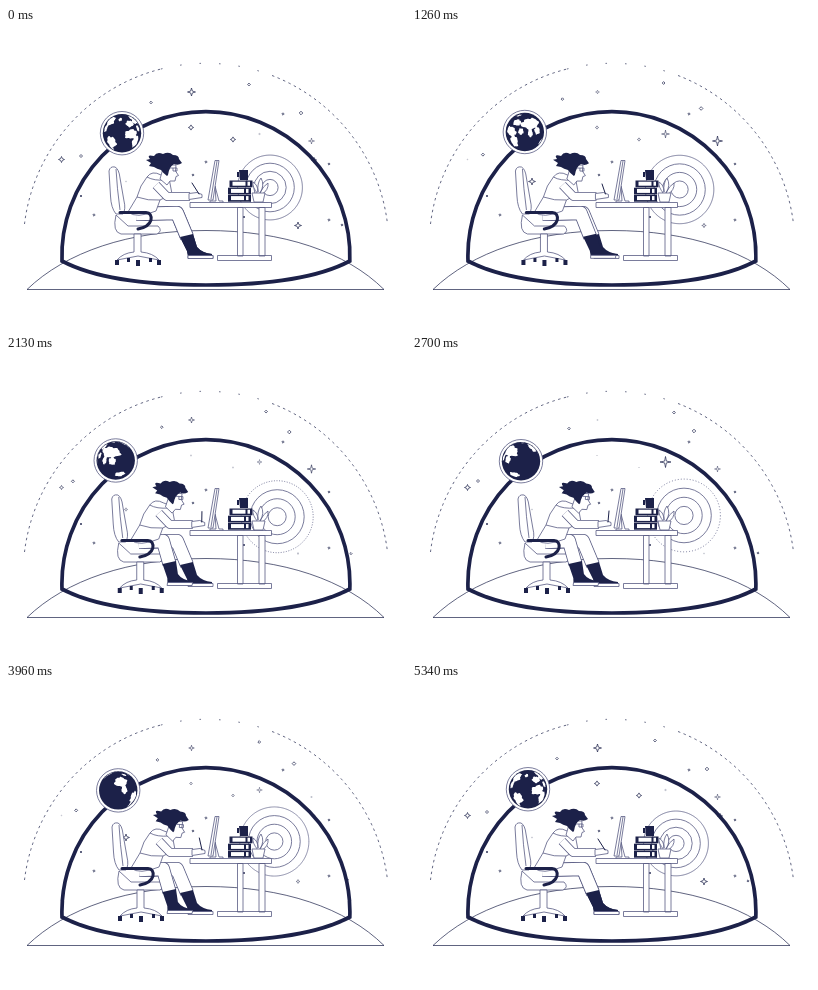
Write an HTML page that moves like this. It is 400x300 px and loops after 5370 ms.

```html
<!DOCTYPE html>
<html lang="en">
<head>
<meta charset="utf-8">
<title>Working under a dome</title>
<style>
  html, body { margin: 0; width: 100%; height: 100%; overflow: hidden; background: #fff; }
  svg { display: block; width: 100vw; height: 100vh; }
  .thin { fill: #fff; stroke: #585b83; stroke-width: .8; stroke-linejoin: round; }
  .line { fill: none; stroke: #585b83; stroke-width: .8; }
  .dark { stroke: #1c2149; stroke-width: .7; }
  .ink { fill: #1c2149; }
  .bold { fill: none; stroke: #1c2149; stroke-width: 3; stroke-linecap: round; }
  .limb { fill: none; stroke-linejoin: round; }
</style>
</head>
<body>
<svg viewBox="0 0 400 300">
  <path class="line dark" stroke-dasharray="2.5 3.5" d="M18.5 196A182.5 182.5 0 0 1 155 41M266 47.500A182.5 182.5 0 0 1 381.500 196"/>
  <path class="line dark" stroke-dasharray="1.5 18" d="M155 41A182.5 182.5 0 0 1 266 47.500"/>
  <path class="thin dark" d="M21 261.500C60 224 123 202.500 200 202.500S340 224 378 261.500Z"/>
  <g id="target"></g>
  <g id="stars"></g>
  <path class="bold" style="stroke-width:3.700" d="M56 233A144 144 0 1 1 343.800 233C312 250 258 257 200 257S88 250 56 233Z"/>
  <g id="globe">
    <circle class="thin" r="21.700"/>
    <circle class="ink" r="19.200"/>
    <path id="land" fill="#fff"/>
  </g>

  <g id="chair">
    <path class="thin" d="M103 143Q104 138 109 139Q113 141 114 150L118 173Q120 181 117 186H110Q105 180 104.500 168Z"/>
    <path class="line" d="M110 141Q111 160 114 182"/>
    <path class="thin" d="M110 187Q106 204 115 206H151Q157 203 152 198H122Z"/>
    <path class="thin" d="M128 206H135V224Q147 225 153 232L132 228L111 232Q117 225 128 224Z"/>
    <path class="ink" d="M109 232h4v5h-4zM121 230h3v4h-3zM130 232h4v6h-4zM143 230h3v4h-3zM151 232h4v5h-4z"/>
  </g>

  <g id="farLeg"></g>
  <g id="nearLeg"></g>

  <g id="torso">
    <path class="thin" d="M155 147Q146 142 141 149Q134 157 131 169L122 184Q130 191 150 183L154 172L166 166L163 150Z"/>
    <path class="line" d="M141 149Q148 153 160 152M131 169Q142 173 154 172"/>
  </g>
  <g id="head">
    <path class="thin" d="M158 137H170L169.500 143L172.500 147.500L170 148.500L169 153H164L161 157L154 151Z"/>
    <path class="ink" d="M161 148Q157 145 155 142Q151 141 148 139L143 138L145 135L140 132L144 131Q140 126 148 128Q151 123 157 126Q163 123 167 127Q173 127 173 131L176 135Q172 138 168 136Q163 139 162 147Z"/>
    <path class="line" d="M164 140H171V143H167V140"/>
  </g>
  <g id="arm"></g>
  <path id="pen" class="bold" style="stroke-width:1"/>
  <path id="armrest" class="bold" d="M114 184.500H140Q146 185 145 192Q143 199 132 201"/>

  <path class="thin" d="M209 158L213 173H217V175H204V173H210Z"/>
  <path class="thin" d="M209 132.500H213L207 172H202Z"/>
  <path class="line" d="M211 133L205 171"/>
  <path class="thin" d="M231.500 179.500H237V228H231.500ZM253 179.500H259V228H253ZM211.500 227.500H265.500V232.500H211.500ZM184 174.500H265.500V179.500H184Z"/>
  <g id="books"></g>
  <path class="ink" d="M233 142H242V152H234ZM231 144h2v5h-2z"/>
  <path class="thin" d="M252 166Q246 159 247 154Q252 157 252 164Q251 155 255 150Q259 157 254 165Q257 158 262 155Q263 162 255 167Z"/>
  <path class="thin" d="M246 165H259L257 174H248Z"/>
</svg>
<script>
const LOOP = 5370;
const TAU = Math.PI * 2;
const $ = id => document.getElementById(id);

function add(parent, tag, attrs) {
  const node = document.createElementNS('http://www.w3.org/2000/svg', tag);
  for (const name in attrs) node.setAttribute(name, attrs[name]);
  return parent.appendChild(node);
}
const move = (node, x, y, extra = '') => node.setAttribute('transform', `translate(${x} ${y}) ${extra}`);
const mix = (a, b, k) => a + (b - a) * k;
function ramp(t, from, to) {
  const k = Math.min(1, Math.max(0, (t - from) / (to - from)));
  return k * k * (3 - 2 * k);
}

function makeLimb(parent, width) {
  const outer = add(parent, 'path', { class: 'limb', stroke: '#585b83', 'stroke-width': width });
  const inner = add(parent, 'path', { class: 'limb', stroke: '#fff', 'stroke-width': width - 1.6 });
  return d => [outer, inner].forEach(path => path.setAttribute('d', d));
}

function makeLeg(parent) {
  const limb = makeLimb(parent, 14);
  const shoe = add(parent, 'g');
  add(shoe, 'path', { class: 'ink', d: 'M-7 0L6 -3L10 10Q15 16 25 17V19H1L0 14Z' });
  add(shoe, 'path', { class: 'thin', d: 'M1 18.500H26V21.500H1Z' });
  return (hip, knee, x, y, skew) => {
    limb(`M${hip} 186L${knee} 185L${x} ${y}`);
    move(shoe, x, y, `skewX(${skew})`);
  };
}
const farLeg = makeLeg($('farLeg'));
const nearLeg = makeLeg($('nearLeg'));
const sleeve = makeLimb($('arm'), 9);
const hand = add($('arm'), 'path', { class: 'thin', d: 'M-10 -3L-2 -4L3 -2L3 1L-10 3Z' });

for (let i = 0; i < 3; i++) {
  const y = 152.500 + i * 7.2, x = i ? 222 : 223.500;
  add($('books'), 'rect', { class: 'ink', x, y, width: 23, height: 6.8 });
  add($('books'), 'rect', { x: x + 3, y: y + 1.2, width: 13, height: 4, fill: '#fff' });
  add($('books'), 'rect', { x: x + 18, y: y + 1.2, width: 2.5, height: 4, fill: '#fff' });
}

const rings = [4, 3, 2, 1].map(step => ({ step, node: add($('target'), 'circle', { class: 'thin' }) }));

// Stars stay in place and pulse a whole number of times per loop.
const sparkles = [];
function sparkle(x, y, r, pulses, phase = 0) {
  const d = `M0 ${-r}L.9 -.9L${r} 0L.9 .9L0 ${r}L-.9 .9L${-r} 0L-.9 -.9Z`;
  sparkles.push({ x, y, pulses, phase, node: add($('stars'), 'path', { class: 'thin dark', d }) });
}
sparkle(185.5, 64, 4, 3);
sparkle(253.5, 106, 5.5, 3, .5);
sparkle(305.5, 113, 5, 1, .75);
sparkle(292, 197.5, 3.5, 1);
sparkle(120, 153.5, 3.5, 2, .5);
sparkle(55.5, 131.5, 3, 2);
sparkle(227, 111.5, 2.6, 1);
sparkle(185, 99.5, 2.6, 1);
sparkle(308, 132, 2.6, 1);

// Small diamonds drift on ellipses.
const dots = [];
function dot(x, y, r, swing = 0, rise = 0, lift = 0) {
  const node = add($('stars'), 'path', { class: 'thin dark', d: `M0 ${-r}L${r} 0L0 ${r}L${-r} 0Z` });
  dots.push({ x, y, swing, rise, lift, node });
}
dot(151, 73.5, 1.3, -6, 1, -2.5);
dot(252.5, 56.5, 1.4, -9.5, 0, -1.5);
dot(288.5, 80, 1.8, 6.5, 5);
dot(70.5, 126.5, 1.5, 4.5, 1.5);
dot(341, 197, 1.1, -5, 0, 1);
dot(277, 86, 1.2);
dot(323, 192, 1.2);
dot(323, 136, 1.1);
dot(75, 168, 1);
dot(88, 187, 1.2);
dot(187, 147, 1.1);
dot(200, 134, 1.2);
dot(238, 189, 1);

// Land is a union of rippled blobs in longitude and latitude.
const RAD = Math.PI / 180;
const TILT = 24 * RAD;
function blob(lon, lat, width, height) {
  return Array.from({ length: 40 }, (_, i) => {
    const a = TAU * i / 40;
    const size = 1 + .1 * Math.sin(5 * a + lon) + .06 * Math.sin(9 * a + lat);
    return [(lon + width * size * Math.cos(a)) * RAD, (lat + height * size * Math.sin(a)) * RAD];
  });
}
const land = [
  blob(-105, 52, 32, 17), blob(-97, 25, 10, 13), blob(-40, 72, 16, 8),
  blob(-60, -10, 18, 19), blob(-67, -36, 7, 16),
  blob(8, 18, 23, 14), blob(24, -12, 14, 22), blob(47, 25, 9, 10),
  blob(18, 51, 22, 11), blob(92, 50, 50, 18), blob(79, 20, 8, 13),
  blob(107, 22, 12, 12), blob(134, -25, 18, 10)
];

function project([lon, lat], center) {
  const depth = Math.cos(lat) * Math.cos(lon - center);
  const x = Math.cos(lat) * Math.sin(lon - center);
  const y = Math.sin(lat) * Math.cos(TILT) - depth * Math.sin(TILT);
  const z = Math.sin(lat) * Math.sin(TILT) + depth * Math.cos(TILT);
  const rim = z > 0 ? 1 : Math.hypot(x, y) || 1; // hidden points slide along the rim
  return { x: 18.6 * x / rim, y: -18.6 * y / rim, z };
}

function landPath(center) {
  return land.map(shape => {
    const points = shape.map(point => project(point, center));
    if (points.every(p => p.z <= 0)) return '';
    return `M${points.map(p => `${p.x.toFixed(2)} ${p.y.toFixed(2)}`).join('L')}Z`;
  }).join('');
}

function draw(t) {
  const turn = t / LOOP;
  const cos = Math.cos(TAU * turn), sin = Math.sin(TAU * turn);

  move($('globe'), 112.5 + 3.5 * cos, 105.2 - 1.2 * sin);
  $('land').setAttribute('d', landPath((360 * turn - 24) * RAD));

  move($('target'), 268 - 4 * cos, 159.5 + 2 * sin);
  for (const { node, step } of rings) node.setAttribute('r', step * (8.6 - .5 * cos));
  rings[0].node.setAttribute('stroke-dasharray', `1 ${Math.max(0, -2 * cos)}`);

  for (const s of sparkles) {
    move(s.node, s.x, s.y, `scale(${.6 + .4 * Math.cos(TAU * (s.pulses * turn + s.phase))})`);
  }
  for (const d of dots) move(d.node, d.x + d.swing * cos, d.y + d.rise * cos + d.lift * sin);

  const lean = ramp(t, 900, 2400) - ramp(t, 4400, 5340);
  const step = ramp(t, 1110, 1700) - ramp(t, 4200, 4950);
  move($('chair'), 3 * lean, 0);
  move($('armrest'), 2 * lean, 0);
  move($('torso'), 3 * lean, 0);
  move($('head'), 6 * lean, 0, `rotate(${3 * lean} 158 150)`);
  farLeg(132 + 3 * lean, 171, 181, 209, 0);
  nearLeg(130 + 3 * lean, mix(171, 157, step), mix(181, 163.5, step), mix(209, 208, step), -9 * step);

  const tip = 193 + 3 * lean;
  sleeve(`M${150 + 3 * lean} 157L${161 + 3 * lean} 168.500L${tip - 9} 168.500`);
  move(hand, tip, 168.5);
  $('pen').setAttribute('d', `M${tip - 3 - 4 * cos} ${155 + sin}L${tip} 166`);
}

function frame() {
  draw(performance.now() % LOOP);
  requestAnimationFrame(frame);
}
frame();
</script>
</body>
</html>
```
